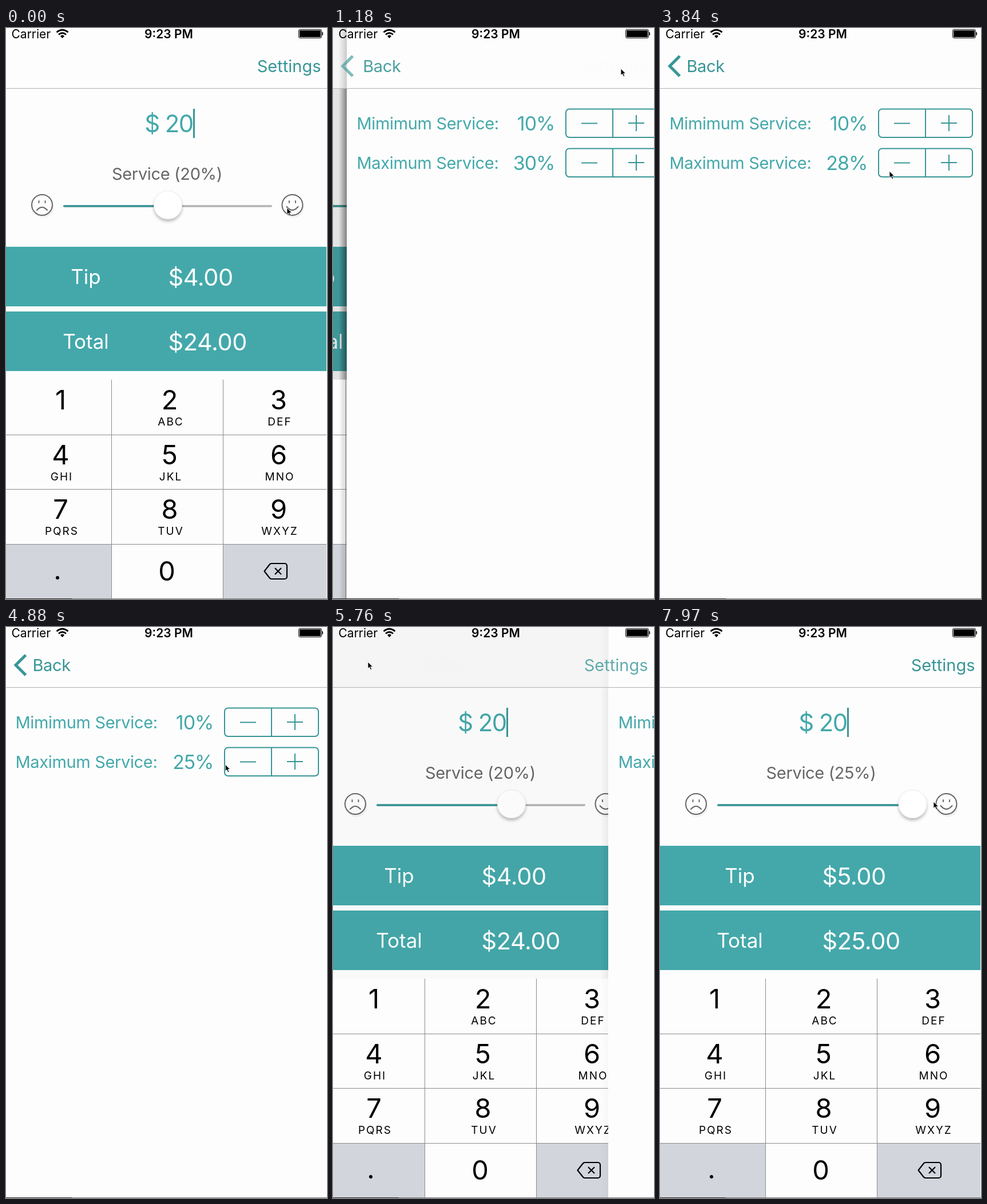
These frames come from a looping animation (561 px wide and 997 px high, 8000 ms). An HTML page:

```html
<!DOCTYPE html>
<html lang="en">
<head>
<meta charset="utf-8">
<title>Tip calculator</title>
<style>
  html, body { margin: 0; width: 100%; height: 100%; overflow: hidden; background: #fdfdfd; }
  svg { display: block; width: 100vw; height: 100vh; }
  text { font-family: Inter, Roboto, sans-serif; font-size: 29px; }
  .mid { text-anchor: middle; }
  .end { text-anchor: end; }
  .teal { fill: #44a8aa; }
  .tint { fill: #389696; }
  .line { fill: none; stroke: #389696; stroke-width: 2; }
  .bar text { fill: #fff; font-size: 35px; }
  .bar .money { font-size: 41.5px; letter-spacing: -.4px; }
  .bill { font-size: 42px; letter-spacing: -1.6px; }
  .label { letter-spacing: -.35px; }
  .pct { font-size: 34px; letter-spacing: -1px; }
  .status { font-size: 21px; }
  .face { fill: none; stroke: #666; stroke-width: 2; stroke-linecap: round; }
  .digit { font-size: 47px; }
  .letters { font-size: 19px; letter-spacing: 2px; }
</style>
</head>
<body>
<svg viewBox="0 0 561 997" preserveAspectRatio="none">
  <defs>
    <linearGradient id="edge">
      <stop offset="0" stop-opacity="0"/>
      <stop offset="1" stop-opacity=".45"/>
    </linearGradient>
    <filter id="lift" x="-30%" y="-30%" width="160%" height="170%">
      <feDropShadow dx="0" dy="4" stdDeviation="2.5" flood-opacity=".25"/>
    </filter>
    <g id="head">
      <circle cx="2" cy="4" r="18.5" fill="#f0f0f0"/>
      <circle r="18" class="face" style="fill:#fdfdfd"/>
      <path class="face" d="M-5.5-7v3M5.5-7v3"/>
    </g>
    <g id="stepper">
      <rect class="line" x="382" y="-24.5" width="164" height="49.500" rx="6"/>
      <path class="line" d="M464-25v50M409 .5h28M491 0h28M505-14v28"/>
    </g>
  </defs>

  <g id="main">
    <rect width="561" height="997" fill="#fdfdfd"/>
    <text class="teal mid bill" x="284.5" y="182">$ 20</text>
    <rect id="caret" class="tint" x="327" y="141" width="3" height="51"/>
    <text id="service" class="mid label" x="281.5" y="265" fill="#666"></text>

    <g transform="translate(63 309)">
      <use href="#head"/><path class="face" d="M-9 9Q0-1 9 9"/>
    </g>
    <g transform="translate(500.5 309)">
      <use href="#head"/><path class="face" d="M-10 3Q0 15 10 3"/>
    </g>
    <rect x="100" y="309.3" width="365" height="3.4" rx="1.7" fill="#b3b3b3"/>
    <rect id="filled" class="tint" x="100" y="309.3" height="3.4" rx="1.7"/>
    <circle id="knob" cy="309" r="24.7" fill="#fff" stroke="#ddd" stroke-width=".6" filter="url(#lift)"/>

    <g class="bar">
      <rect class="teal" y="382" width="561" height="104"/>
      <text class="mid" x="139.5" y="447">Tip</text>
      <text id="tip" class="money" x="283.5" y="449.5"></text>
      <rect class="teal" y="495" width="561" height="104"/>
      <text class="mid" x="139.5" y="560">Total</text>
      <text id="total" class="money" x="283.5" y="562.5"></text>
    </g>
    <rect id="dim" y="106" width="561" height="508"/>

    <g id="keys">
      <rect y="614" width="561" height="383" fill="#fdfdfd"/>
      <path d="M0 902h184v95H0zM380 902h181v95H380z" fill="#d2d5dc"/>
      <path d="M184.5 614v383M379.5 614v383M0 710.5h561M0 805.5h561M0 901.5h561" stroke="#8c8c8c"/>
      <path d="M464 935h23a4 4 0 0 1 4 4v19a4 4 0 0 1-4 4h-23q-2 0-3.5-2l-9-11.5 9-11.5q1.5-2 3.5-2zM470 943l11 11M481 943l-11 11" fill="none" stroke="#000" stroke-width="2.2" stroke-linejoin="round"/>
    </g>
  </g>

  <g id="panel">
    <g id="shadow" fill="url(#edge)">
      <rect x="-15" width="14" height="614"/>
      <rect x="-15" y="614" width="14" height="383" opacity=".4"/>
    </g>
    <rect x="-1" width="562" height="997" fill="#fdfdfd"/>
    <g class="teal">
      <text class="label" x="16.5" y="177">Mimimum Service:</text>
      <text class="label" x="16.5" y="246">Maximum Service:</text>
      <text class="end pct" x="362.5" y="179">10%</text>
      <text id="max" class="end pct" x="362.5" y="248"></text>
    </g>
    <rect id="press" class="tint" x="383" y="211" width="80" height="48"/>
    <use href="#stepper" y="166"/>
    <use href="#stepper" y="235"/>
  </g>

  <rect width="561" height="105" fill="#fdfdfd" opacity=".6"/>
  <rect id="shade" height="105" opacity=".03"/>
  <path d="M0 105.5h561" stroke="#b2b2b2"/>
  <path id="chevron" class="line" style="stroke-width:5" d="M34.5 49L17 66.5l17.5 17.5"/>
  <text id="back" class="tint label" y="77">Back</text>
  <text id="settings" class="tint end" x="550.5" y="77">Settings</text>

  <text class="status" x="9.5" y="18">Carrier</text>
  <g fill="none" stroke="#000" stroke-width="2.8">
    <path d="M88.5 7.5q10-8.5 20 0M92 11.5q6.5-5.500 13 0"/>
    <path d="M95 14q3.5-2.8 7 0l-3.5 4z" fill="#000" stroke="none"/>
  </g>
  <text class="status mid" x="284.5" y="18" font-weight="600">9:23 PM</text>
  <rect x="511.5" y="2.5" width="40" height="15" rx="2.5" fill="none" stroke="#000"/>
  <path d="M513 4h37v12h-37zM552.5 7h1q1.5 3 0 6h-1z"/>

  <path d="M115 996.5h446" stroke="#777"/>
  <path d="M0 996.5h115" stroke="#222"/>
  <path id="cursor" d="M0 0v11.5l2.7-2.4 2 4.6 2-.9-2-4.4h3.8z" stroke="#fff" stroke-width=".8"/>
</svg>

<script>
  const LOOP = 8000, TICK = 7970 / 54;            // ms; motion advances in even ticks
  const WIDTH = 561, KNOB_MIN = 124.5, KNOB_MAX = 441.5;
  const PUSH = { start: 1040, rate: .0346 };
  const POP = { start: 5556, rate: .0173 };
  const GRAB = 6600;

  // Where the pointer heads next: [ms, x, y]
  const stops = [
    [0, 491, 314], [880, 503, 71], [1850, 503, 71], [2214, 464, 156], [2950, 501, 197],
    [3690, 401, 250], [4800, 401, 250], [5310, 61, 61], [6050, 61, 61], [6346, 323, 243],
    [6640, 336, 308], [7090, 262, 308], [7680, 505, 306], [7970, 478, 305]
  ];

  const ui = {};
  document.querySelectorAll('svg [id]').forEach(el => ui[el.id] = el);

  const clamp = (v, lo, hi) => Math.min(hi, Math.max(lo, v));
  const set = (el, attrs) => {
    for (const name in attrs) el.setAttribute(name, attrs[name]);
  };
  const move = (el, x, y = 0) => set(el, { transform: `translate(${x} ${y})` });

  // Critically damped spring from 0 to 1
  function spring(t, { start, rate }) {
    const s = Math.max(0, t - start) * rate;
    return 1 - (1 + s) * Math.exp(-s);
  }

  function pointerAt(t) {
    const i = stops.findLastIndex(stop => stop[0] <= t);
    const [t0, x0, y0] = stops[i];
    const [t1, x1, y1] = stops[i + 1] || [LOOP, x0, y0];
    const p = (t - t0) / (t1 - t0), ease = p * p * (3 - 2 * p);
    return [x0 + (x1 - x0) * ease, y0 + (y1 - y0) * ease];
  }

  function addText(cls, x, y, str) {
    const el = document.createElementNS('http://www.w3.org/2000/svg', 'text');
    set(el, { class: cls + ' mid', x, y });
    el.textContent = str;
    ui.keys.append(el);
  }

  function buildKeys() {
    ['', 'ABC', 'DEF', 'GHI', 'JKL', 'MNO', 'PQRS', 'TUV', 'WXYZ'].forEach((str, i) => {
      const x = 95.5 + i % 3 * 190.5, y = Math.floor(i / 3) * 95.5;
      addText('digit', x, 666 + y, i + 1);
      addText('letters', x + 2, 694 + y, str);
    });
    addText('digit', 281, 965, 0);
    addText('digit', 90, 963, '.');
  }

  function renderNav(t, cover) {
    const x = Math.round(WIDTH * (1 - cover));
    move(ui.main, Math.round(-.302 * WIDTH * cover));
    move(ui.panel, x);
    set(ui.shadow, { opacity: cover });
    set(ui.dim, { opacity: .105 * cover });
    set(ui.shade, { width: cover > .01 ? x : 0 });

    const pressing = t > 870 && t < PUSH.start;
    set(ui.settings, { opacity: pressing ? .3 : (1 - cover) ** 1.6 });
    set(ui.back, { opacity: cover ** 2.3, x: 46.5 + .23 * x });
    set(ui.chevron, { opacity: cover ** 10 });
  }

  function renderStepper(t) {
    const taps = clamp(Math.floor((t - 3400) / 215), 0, 5);
    ui.max.textContent = 30 - taps + '%';
    set(ui.press, { opacity: t > 4270 && t < 4570 ? .15 : 0 });
    return 30 - taps;
  }

  function renderTip(t, pointerX, max) {
    const rest = KNOB_MIN + (KNOB_MAX - KNOB_MIN) * 10 / (max - 10);
    const knob = t < GRAB ? rest : clamp(pointerX, KNOB_MIN, KNOB_MAX);
    const ratio = (knob - KNOB_MIN) / (KNOB_MAX - KNOB_MIN);
    const pct = Math.round(10 + ratio * (max - 10));
    const tip = 20 * pct / 100;

    set(ui.knob, { cx: knob });
    set(ui.filled, { width: knob - 100 });
    set(ui.caret, { opacity: t % 1100 < 550 ? 1 : 0 });
    ui.service.textContent = `Service (${pct}%)`;
    ui.tip.textContent = '$' + tip.toFixed(2);
    ui.total.textContent = '$' + (20 + tip).toFixed(2);
  }

  function render(t) {
    const [x, y] = pointerAt(t);
    move(ui.cursor, x, y);
    renderNav(t, spring(t, PUSH) - spring(t, POP));
    renderTip(t, x, renderStepper(t));
  }

  function loop() {
    const ms = performance.now() % LOOP;
    render(Math.floor((ms + 8) / TICK) * TICK);
    requestAnimationFrame(loop);
  }

  buildKeys();
  loop();
</script>
</body>
</html>
```
